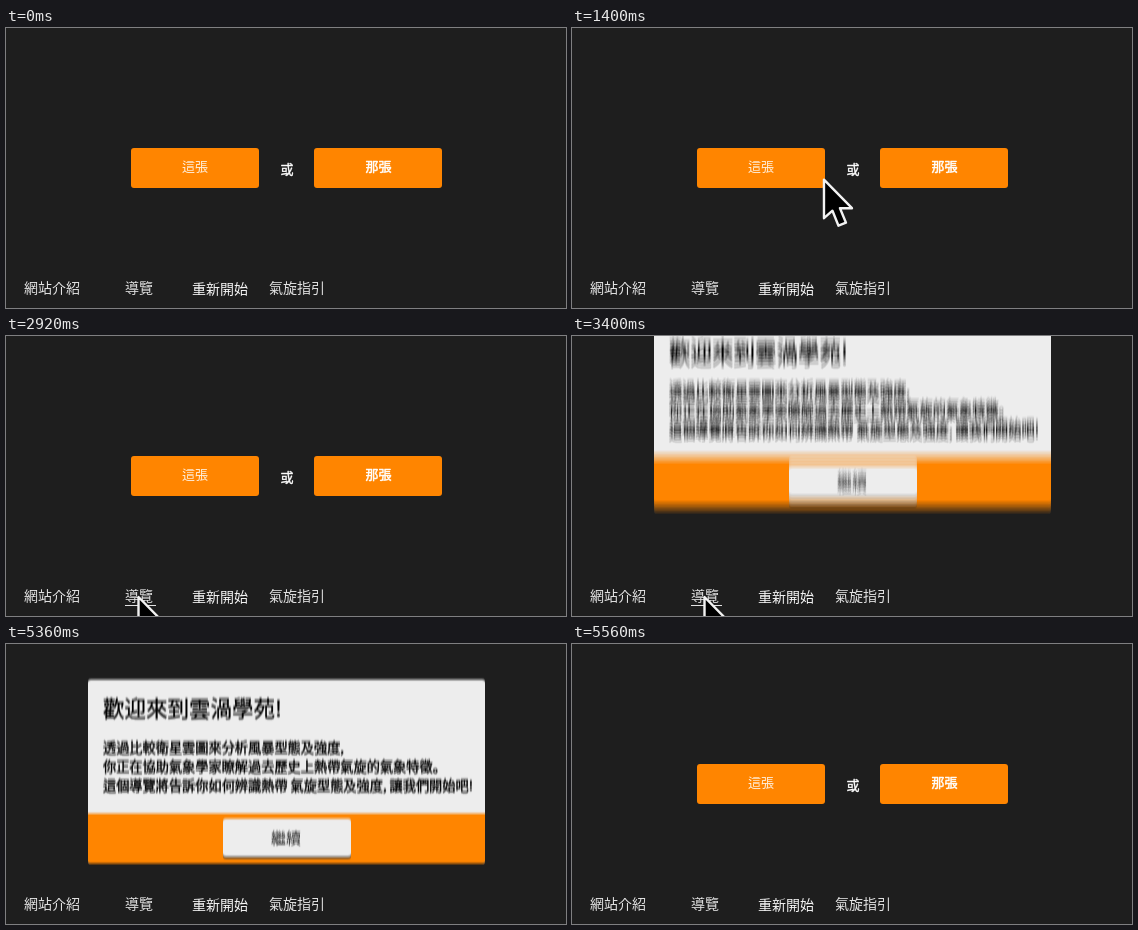
Recreate the animation shown at these times as an HTML page with a canvas. Size 560 by 280 pixels, loop 5760 ms.

```html
<!DOCTYPE html>
<html lang="zh-Hant">
<head>
<meta charset="utf-8">
<style>
html, body { margin: 0; width: 100%; height: 100%; overflow: hidden; background: #1e1e1e; }
canvas { display: block; }
</style>
</head>
<body>
<canvas id="stage" width="560" height="280"></canvas>
<script>
const LOOP = 5760, STEP = 40, W = 560, H = 280;
const ORANGE = '#ff8500', PALE = '#ededed';
const FONT = '"Noto Sans CJK JP", "Noto Sans CJK SC", "Noto Sans CJK", sans-serif';

const easeOut = n => u => 1 - (1 - u) ** n;
const easeIn = n => u => u ** n;
const easeInOut = u => u < .5 ? 2 * u * u : 1 - 2 * (1 - u) ** 2;
const progress = (t, start, length) => Math.min(1, Math.max(0, (t - start) / length));

const ctx = document.getElementById('stage').getContext('2d');
const layer = () => {
  const c = document.createElement('canvas');
  c.width = W;
  c.height = H;
  return c.getContext('2d');
};

// A thin outline of width `bold` makes the strokes heavier.
function text(c, str, x, midY, size, color, bold = 0, align = 'left') {
  const y = midY + size * .37;
  c.font = `${size}px ${FONT}`;
  c.textAlign = align;
  c.fillStyle = c.strokeStyle = color;
  c.fillText(str, x, y);
  if (bold) {
    c.lineWidth = bold;
    c.lineJoin = 'round';
    c.strokeText(str, x, y);
  }
}

function box(c, x, y, w, h, color, radius = 3) {
  c.fillStyle = color;
  c.beginPath();
  c.roundRect(x, y, w, h, radius);
  c.fill();
}

function drawPage(c) {
  c.fillStyle = '#1e1e1e';
  c.fillRect(0, 0, W, H);
  box(c, 125, 120, 128, 40, ORANGE);
  box(c, 308, 120, 128, 40, ORANGE);
  text(c, '這張', 189, 138, 13, '#fff0de', 0, 'center');
  text(c, '那張', 372.5, 138, 13, '#fff', .5, 'center');
  text(c, '或', 281, 141, 13, '#fff', .4, 'center');
  text(c, '網站介紹', 18, 260, 14, '#e2e2e2');
  text(c, '導覽', 119, 260, 14, '#e2e2e2');
  text(c, '重新開始', 186, 261, 14, '#f6f6f6');
  text(c, '氣旋指引', 263, 260, 14, '#e2e2e2');
}

function drawPanel(c) {
  box(c, 82, 39, 397, 184, PALE);
  box(c, 82, 173, 397, 50, ORANGE, [0, 0, 3, 3]);
  box(c, 217, 179, 128, 39, '#554c42');
  box(c, 217, 178, 128, 38, PALE);
  text(c, '歡迎來到雲渦學苑!', 97, 68, 21.5, '#000', .3);
  text(c, '透過比較衛星雲圖來分析風暴型態及強度,', 97, 107, 13.2, '#000', .45);
  text(c, '你正在協助氣象學家瞭解過去歷史上熱帶氣旋的氣象特徵。', 97, 126, 13.2, '#000', .45);
  text(c, '這個導覽將告訴你如何辨識熱帶 氣旋型態及強度, 讓我們開始吧!', 97, 145, 13.2, '#000', .45);
  text(c, '繼續', 280, 197, 15, '#222', 0, 'center');
}

const page = layer(), panel = layer(), mix = layer();
drawPage(page);
drawPanel(panel);

const panelIn = easeOut(5.1), panelOut = easeIn(2.35);
const panelY = t => -223 * (1 - panelIn(progress(t, 3280, 480)) + panelOut(progress(t, 5320, 240)));

// Vertical motion blur: average the scene over a short exposure.
function showPanel(t) {
  if (t <= 3280 || t >= 5560) return;
  const samples = 10, exposure = 20;
  for (let i = 0; i < samples; i++) {
    const at = t + exposure * ((i + .5) / samples - .5);
    mix.drawImage(page.canvas, 0, 0);
    mix.drawImage(panel.canvas, 0, panelY(at));
    ctx.globalAlpha = 1 / (i + 1);
    ctx.drawImage(mix.canvas, 0, 0);
  }
  ctx.globalAlpha = 1;
}

// Each move: start, length, target x, target y, easing
const snap = easeOut(2.85);
const home = [567, 194];
const moves = [
  [320, 160, 403, 146, snap],
  [680, 120, 204, 150, snap],
  [1000, 120, 389, 151, snap],
  [1360, 120, 189, 152, snap],
  [1600, 120, 374, 154, snap],
  [2320, 600, 132.5, 261, easeInOut],
  [3400, 320, ...home, easeInOut]
];

function pointerAt(t) {
  let [x, y] = home;
  for (const [start, length, toX, toY, ease] of moves) {
    const k = ease(progress(t, start, length));
    x += (toX - x) * k;
    y += (toY - y) * k;
  }
  return [x, y];
}

const arrow = new Path2D('M0 0V38.5L8.5 31L14.5 46L22 43L16 28.5H28Z');

function draw(t) {
  const [x, y] = pointerAt(t);
  ctx.drawImage(page.canvas, 0, 0);
  showPanel(t);
  if (x > 119 && x < 150 && y > 250) {
    ctx.fillStyle = '#e2e2e2';
    ctx.fillRect(119, 269, 31, 1);
  }
  ctx.save();
  ctx.translate(x, y);
  ctx.fillStyle = '#000';
  ctx.strokeStyle = '#f2f2f2';
  ctx.lineWidth = 2.4;
  ctx.lineJoin = 'round';
  ctx.fill(arrow);
  ctx.stroke(arrow);
  ctx.restore();
}

const began = performance.now();
function tick() {
  const t = (performance.now() - began) % LOOP;
  draw(Math.floor(t / STEP) * STEP);
  requestAnimationFrame(tick);
}
tick();
</script>
</body>
</html>
```
